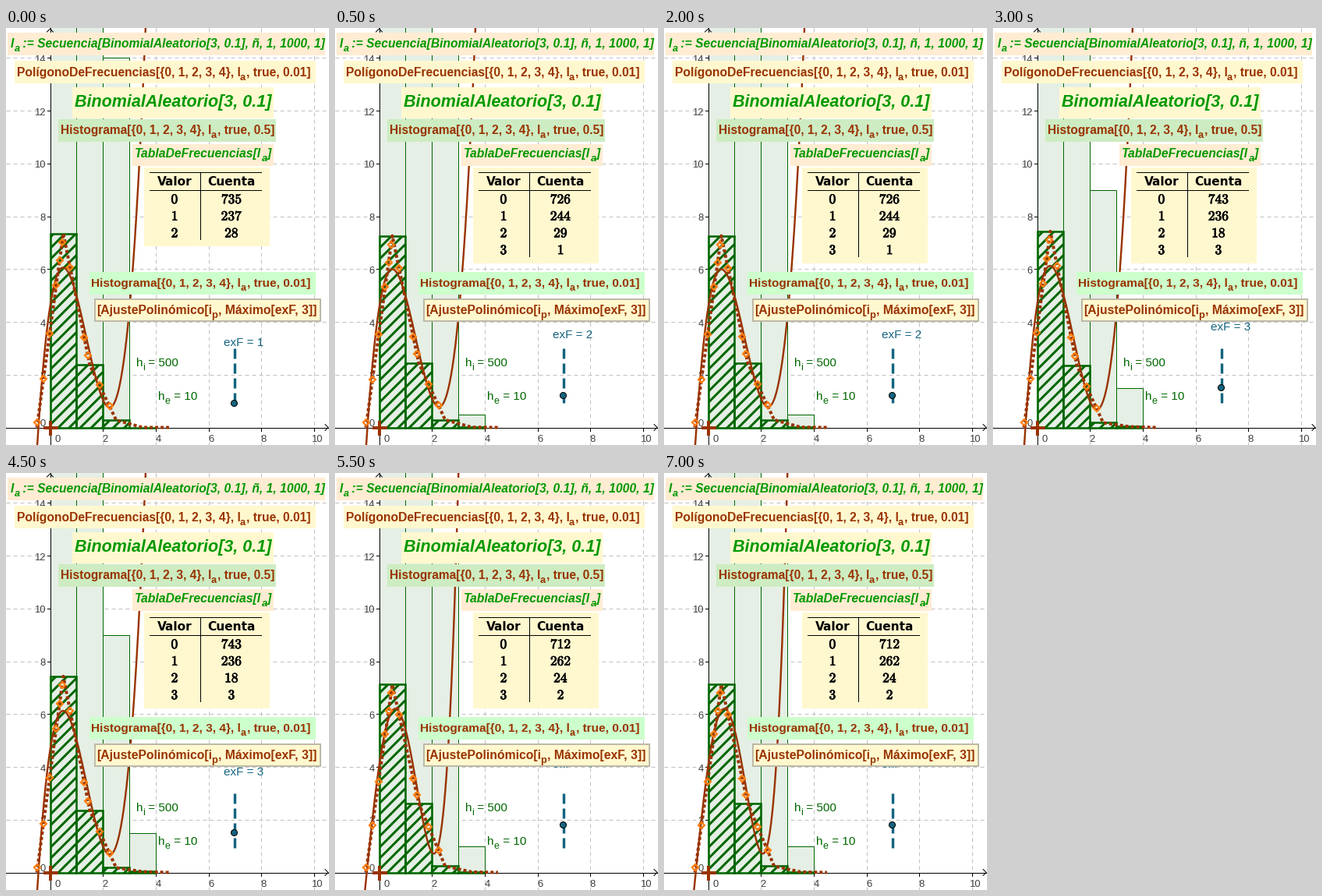
A matplotlib script for the animation above (8 s loop, 414 by 535 pixels).

```python
import numpy as np
import matplotlib.pyplot as plt
from matplotlib.animation import FuncAnimation
from matplotlib.collections import LineCollection
from matplotlib.patches import Circle, Rectangle
from matplotlib.patheffects import withStroke
from matplotlib.textpath import TextPath

W, H, DPI = 414, 535, 64
PX = 72 / DPI  # points per pixel
X0, Y0, UNIT = 56.5, 512.5, 33.87

BROWN, GREEN, DARK = "#993300", "#009900", "#006600"
ORANGE, TEAL, GRID = "#ff7f0e", "#14647f", "#c0c0c0"
CREAM, PEACH, MINT = "#fff8cf", "#ffecd2", "#ccffcc"

COUNTS = [(735, 237, 28, 0), (726, 244, 29, 1),
          (743, 236, 18, 3), (712, 262, 24, 2)]
SAMPLE_X = np.array([-.475, -.25, -.016, .235, .36, .455,
                     .755, 1.29, 1.43, 1.87, 2.25])

fig = plt.figure(figsize=(W / DPI, H / DPI), dpi=DPI, facecolor="white")
ax = fig.add_axes([0, 0, 1, 1])


def sx(x):
    return X0 + UNIT * np.asarray(x)


def sy(y):
    return Y0 - UNIT * np.asarray(y)


def line(xs, ys, color, width=1, z=1, **kw):
    return ax.plot(xs, ys, color=color, lw=width * PX, zorder=z, **kw)[0]


def box(x0, y0, x1, y1, face, edge="none", width=0, z=10, **kw):
    return ax.add_patch(Rectangle((x0, y0), x1 - x0, y1 - y0, fc=face,
                                  ec=edge, lw=width * PX, zorder=z, **kw))


def text(x, y, s, size, color, z=12, **kw):
    kw.setdefault("family", "Liberation Sans")
    return ax.text(x, y, s, fontsize=size * PX, color=color, zorder=z,
                   va="baseline", **kw)


def formula(x, y, s, size, color, **kw):
    """Write s from left to right; the character after each '_' is lowered."""
    parts = s.split("_")
    runs = [(parts[0], False)]
    for part in parts[1:]:
        runs += [(part[0], True), (part[1:], False)]
    # slanted glyphs already lean over their advance width
    gap = 0 if kw.get("style") == "italic" else .06 * size
    for run, low in runs:
        px = size * (.82 if low else 1)
        t = text(x, y + (.33 * size if low else 0), run, px, color, **kw)
        path = TextPath((0, 0), run, size=px, prop=t.get_fontproperties())
        x += path.get_extents().x1 + gap


def draw_grid():
    for v in range(2, 15, 2):
        line([0, W], [sy(v)] * 2, GRID, dashes=(5, 4))
        if v <= 10:
            line([sx(v)] * 2, [0, H], GRID, dashes=(5, 4))


def draw_axes():
    line([0, W], [Y0, Y0], "black", z=3)
    line([X0, X0], [0, H], "black", z=3)
    line([W - 5, W - 1, W - 5], [Y0 - 4, Y0, Y0 + 4], "black", z=3)
    line([X0 - 4, X0, X0 + 4], [5, 1, 5], "black", z=3)
    for v in range(0, 15, 2):
        line([X0 - 4, X0], [sy(v)] * 2, "black", z=3)
        text(51, sy(v) + (5.5 if v else -1.5), str(v), 13, "#404040",
             z=3, ha="right")
        if v <= 10:
            line([sx(v)] * 2, [Y0, Y0 + 4], "black", z=3)
            text(sx(v) + (3 if v else 10), 531, str(v), 13, "#404040",
                 z=3, ha="center")


def draw_bars(counts):
    for i, n in enumerate(counts):
        box(sx(i), sy(n * .5), sx(i + 1), Y0, "#e5efe5", DARK, 1, z=2)
    for i, n in enumerate(counts):
        left, right, top = sx(i), sx(i + 1), sy(n * .01)
        bar = box(left, top, right, Y0, "none", DARK, 2.6, z=4)
        sums = np.arange(0, W + H, 14.14)
        stripes = LineCollection([[(left, c - left), (right, c - right)]
                                  for c in sums if c > left + top],
                                 colors=DARK, lw=3 * PX, zorder=4)
        ax.add_collection(stripes, autolim=False)
        stripes.set_clip_path(bar)


def draw_curves(counts, degree):
    nodes = np.arange(-.5, 5)
    heights = np.array([0, *counts, 0]) * .01
    line(sx(nodes), sy(heights), BROWN, 4, z=5, linestyle=(0, (1, .75)))

    ys = np.interp(SAMPLE_X, nodes, heights)
    xs = np.linspace(-.8, 4.5, 500)
    fit = np.polyval(np.polyfit(SAMPLE_X, ys, degree), xs)
    line(sx(xs), sy(fit), BROWN, 2.4, z=6)
    line(sx(SAMPLE_X), sy(ys), "none", 0, z=7, marker="D",
         ms=6 * PX, mfc="none", mec=ORANGE, mew=2.2 * PX)
    line([X0], [Y0], "none", 0, z=7, marker="+",
         ms=19 * PX, mec=BROWN, mew=4 * PX)


def draw_labels():
    bold = dict(weight="bold")
    slant = dict(weight="bold", style="italic")

    box(2, 6, 409, 35, PEACH)
    formula(6, 25, "l_a := Secuencia[BinomialAleatorio[3, 0.1], ñ, 1, 1000, 1]",
            15.6, GREEN, **slant)
    box(11, 42, 397, 71, CREAM)
    formula(14, 62, "PolígonoDeFrecuencias[{0, 1, 2, 3, 4}, l_a, true, 0.01]",
            15.6, BROWN, **bold)
    box(85, 76, 343, 116, CREAM)
    formula(88, 101, "BinomialAleatorio[3, 0.1]", 21.5, GREEN, **slant)
    box(67, 117, 346, 146, "#cdecc2")
    formula(70, 136, "Histograma[{0, 1, 2, 3, 4}, l_a, true, 0.5]",
            15.5, BROWN, **bold)
    box(162, 149, 343, 177, PEACH)
    formula(165, 166, "TablaDeFrecuencias[l_a]", 15.8, GREEN, **slant)
    box(107, 313, 397, 342, MINT)
    formula(109, 332, "Histograma[{0, 1, 2, 3, 4}, l_a, true, 0.01]",
            15.4, BROWN, **bold)
    box(114, 348, 403, 376, CREAM, "#bdb9a8", 2)
    formula(116, 367, "[AjustePolinómico[i_p, Máximo[exF, 3]]",
            15.7, BROWN, **bold)

    formula(167, 434, "h_i = 500", 15.3, DARK)
    formula(195, 477, "h_e = 10", 15.3, DARK)


def draw_table(counts):
    rows = [(v, n) for v, n in enumerate(counts) if n]
    bottom = 208 + 21.7 * len(rows)
    box(177, 179, 338, bottom + 7, CREAM)
    line([184, 327], [184.5] * 2, "black", z=12)
    line([184, 327], [207.5] * 2, "black", z=12)
    line([248.5] * 2, [186, bottom - 2], "black", z=12)
    for x, head in ((216.5, "Valor"), (289, "Cuenta")):
        text(x, 202, head, 15.4, "black", family="DejaVu Sans",
             weight="bold", ha="center")
    heavy = [withStroke(linewidth=.8 * PX, foreground="black")]
    for k, row in enumerate(rows):
        for x, n in zip((216.5, 289.5), row):
            text(x, 225 + 21.7 * k, rf"$\mathbf{{{n}}}$", 17.4, "black",
                 math_fontfamily="cm", ha="center", path_effects=heavy)


def draw_slider(value):
    knob = 491 - 10 * value
    line([292.5] * 2, [481, 411], TEAL, 3.4, z=8,
         linestyle=(0, (13 / 3.4, 6 / 3.4)))
    ax.add_patch(Circle((292.5, knob + .5), 4, fc=TEAL, ec="black",
                        lw=PX, zorder=9))
    text(279, knob - 73, f"exF = {value}", 15.3, TEAL, z=8)


def draw(frame):
    step = (frame + 4) // 5  # one short state, then three long ones
    counts = COUNTS[step]
    ax.clear()
    ax.set_axis_off()
    draw_grid()
    draw_axes()
    draw_bars(counts)
    draw_curves(counts, max(step + 1, 3))
    draw_slider(step + 1)
    draw_labels()
    draw_table(counts)
    ax.set(xlim=(0, W), ylim=(H, 0))
    return []


anim = FuncAnimation(fig, draw, frames=16, interval=500,
                     init_func=lambda: [], repeat=True, repeat_delay=0)
plt.show()
```
